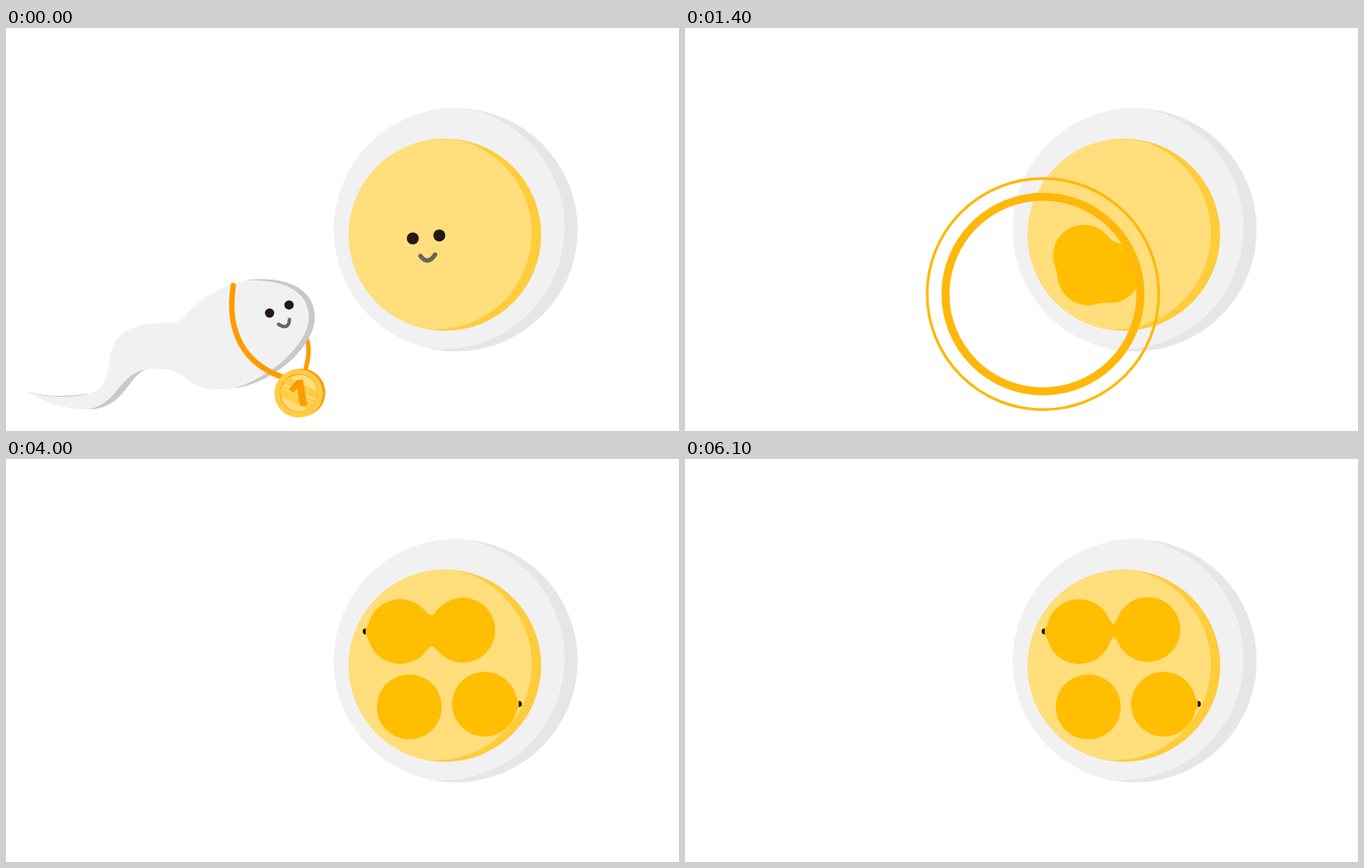
Write an HTML page that moves like this. It is 900 by 540 pixels and loops after 6600 ms.

```html
<!DOCTYPE html>
<html lang="en">
<head>
<meta charset="utf-8">
<title>Egg</title>
<style>
html, body { margin: 0; width: 100%; height: 100%; overflow: hidden; background: #fff; }
svg { display: block; width: 100vw; height: 100vh; }
</style>
</head>
<body>
<svg viewBox="0 0 900 540">
  <defs>
    <clipPath id="whiteClip"><circle cx="601.5" cy="270.3" r="163"/></clipPath>
    <clipPath id="yolkClip"><circle cx="587" cy="277" r="128.7"/></clipPath>
    <clipPath id="coinClip"><circle cx="391.5" cy="489" r="25"/></clipPath>
    <filter id="goo" filterUnits="userSpaceOnUse" x="440" y="140" width="300" height="290" color-interpolation-filters="sRGB">
      <feGaussianBlur stdDeviation="5.5"/>
      <feColorMatrix values="0 0 0 0 1  0 0 0 0 .745  0 0 0 0 0  0 0 0 18 -8.3"/>
    </filter>
    <linearGradient id="fade" gradientUnits="userSpaceOnUse" x1="0" x2="0">
      <stop offset="0" stop-color="#ffb80a" stop-opacity="0"/>
      <stop offset="1" stop-color="#ffb80a"/>
    </linearGradient>
  </defs>

  <g id="egg">
    <circle cx="601.5" cy="270.3" r="163" fill="#e6e6e6"/>
    <circle cx="584" cy="267.5" r="163" fill="#f1f1f1" clip-path="url(#whiteClip)"/>
    <path d="M570 110A163 163 0 0 0 560 428V110Z" fill="#f1f1f1" clip-path="url(#whiteClip)"/>
    <circle cx="587" cy="277" r="128.7" fill="#ffcc3b"/>
    <circle cx="574.5" cy="275" r="128.7" fill="#ffde7b" clip-path="url(#yolkClip)"/>
    <g id="face">
      <circle cx="544" cy="282" r="8" fill="#231815"/>
      <circle cx="579.5" cy="278" r="8" fill="#231815"/>
      <path d="M554.3 305.5Q564 318.5 573.8 303.6" fill="none" stroke="#6b665e" stroke-width="6" stroke-linecap="round"/>
    </g>
    <g id="cells" filter="url(#goo)"></g>
    <g id="nubs">
      <path d="M487 218Q483.5 226 480 227.5V235Q483.5 237 487 246Z" fill="#ffbe00"/>
      <path d="M481 227A4 4 0 0 0 481 235Z" fill="#111"/>
      <path d="M680 314Q683.5 323 686.5 324.5V332Q683.5 334 680 344Z" fill="#ffbe00"/>
      <path d="M685.8 324.2A4 4 0 0 1 685.8 332.2Z" fill="#111"/>
    </g>
  </g>

  <g id="swimmer">
    <path d="M402 416C408 432 403 450 396 474" fill="none" stroke="#ff9b00" stroke-width="6"/>
    <path fill="#f1f1f1" d="M28 487C60 497 95 492 110 490C155 480 120 425 165 404C195 390 225 400 237 389C265 355 300 340 330 337C380 333 413 352 413 388C413 425 355 482 290 484C262 485 248 477 238 467C225 457 212 456 190 457C165 460 160 511 110 511C75 511 50 500 28 487Z"/>
    <g fill="#c9c9c9">
      <path d="M320 338.2Q325 337.4 330 337C380 333 413 352 413 388C413 425 360 476 305 482.8C352 469 405 425 405 387C405 352 370 336 320 338.2Z"/>
      <path d="M190 457C165 460 160 511 110 511C152 503 150 462 190 457Z"/>
      <path d="M28 487C60 497 95 492 112 489.6C92 496 52 496 28 487Z"/>
    </g>
    <circle cx="352.5" cy="382" r="6.2" fill="#231815"/>
    <circle cx="378.5" cy="371.2" r="6.2" fill="#231815"/>
    <path d="M364.5 397C371 401.5 379 402 379 390.5" fill="none" stroke="#6b6766" stroke-width="4.6" stroke-linecap="round"/>
    <g id="medal">
      <path d="M304 345C297 390 305 445 370 468" fill="none" stroke="#ff9b00" stroke-width="7.2" stroke-linecap="round"/>
      <circle cx="394.8" cy="488.6" r="32.2" fill="#ff9b00"/>
      <circle cx="391.4" cy="489.6" r="32.4" fill="#ffcc45"/>
      <circle cx="391.5" cy="489" r="25.5" fill="#ff9b00"/>
      <g clip-path="url(#coinClip)">
        <circle cx="392.6" cy="489.6" r="25" fill="#ffde7b"/>
        <path d="M360 465L425 497M360 484L425 516" stroke="#ffcc45" stroke-width="10"/>
        <path d="M360 475L425 507" stroke="#ffcc45" stroke-width="3"/>
      </g>
      <text transform="translate(395 506.5) rotate(-10)" text-anchor="middle" font-family="'Open Sans', sans-serif" font-weight="800" font-size="49" fill="#ff9b00">1</text>
    </g>
  </g>

  <g id="rings" fill="none" stroke="#ffb80a"></g>
  <g id="rays" stroke="url(#fade)" stroke-width="5.2"></g>
</svg>
<script>
const LOOP = 6600, STEP = 100;
const $ = id => document.getElementById(id);
const clamp = x => Math.min(1, Math.max(0, x));
const mix = (a, b, k) => a + (b - a) * k;
const show = (el, on) => el.setAttribute('display', on ? 'inline' : 'none');

function add(parent, tag, attrs) {
  const el = document.createElementNS('http://www.w3.org/2000/svg', tag);
  set(el, attrs);
  return parent.appendChild(el);
}
function set(el, attrs) {
  for (const k in attrs) el.setAttribute(k, attrs[k]);
}
// keys: [[time, value, value...], ...], linear between neighbours
function track(keys, t) {
  let i = 0;
  while (i < keys.length - 2 && t >= keys[i + 1][0]) i++;
  const a = keys[i], b = keys[i + 1], k = clamp((t - a[0]) / (b[0] - a[0]));
  return a.slice(1).map((v, j) => mix(v, b[j + 1], k));
}

const paths = [
  [[800, 542, 330], [1100, 537, 321], [1800, 528.5, 283], [2650, 527, 231.3]],
  [[800, 542, 330], [1100, 539, 329], [1800, 539.3, 332.2]],
  [[800, 542, 330], [1100, 555, 328], [1800, 586, 327], [2650, 640, 328.5]],
  [[800, 542, 330], [1100, 538, 322], [1800, 528.5, 285], [2700, 529, 238.5], [4130, 619, 228.5]]
];
const size = [[800, 0], [1100, 41], [1800, 41.7], [2650, 43.6]];
const pose = [
  [700, 1, 0, 0, 1, 70, -25],
  [1100, .5, .11, 0, .99, 297, -53],
  [1350, 0, 0, 0, 0, 510, 360]
];
const ringSpec = [{ start: 731, width: 11.8 }, { start: 889, width: 23.7 }];
const bursts = [{ start: 600, x: 482.5, y: 360 }, { start: 4250, x: 586.5, y: 275 }];

const cells = paths.map(() => add($('cells'), 'circle', { fill: '#ffbe00' }));
const rings = ringSpec.map(() => add($('rings'), 'circle', { cx: 478.7, cy: 356.5 }));
// the tiny x offset keeps each line's box from being empty
const rays = Array.from({ length: 10 }, (_, i) =>
  add($('rays'), 'line', { x1: 0, x2: .01, transform: `rotate(${i * 36})` }));

function drawEgg(t) {
  const k = clamp((t - 4900) / 1200);
  const lift = -5.5 * (1 - Math.cos(2 * Math.PI * k)) / 2;
  $('egg').setAttribute('transform', `translate(0 ${lift})`);
  $('face').setAttribute('opacity', 1 - clamp((t - 900) / 400));
  show($('nubs'), t >= 2600);
  show($('cells'), t > 800);
  const [r] = track(size, t);
  cells.forEach((c, i) => {
    const [cx, cy] = track(paths[i], t);
    set(c, { cx, cy, r });
  });
}

function drawSwimmer(t) {
  const k = Math.pow(clamp(t / 700), 1.6);
  const m = t < 700 ? [1, 0, 0, 1, 70 * k, -25 * k] : track(pose, t);
  $('swimmer').setAttribute('transform', `matrix(${m})`);
  show($('swimmer'), t < 1350);
  show($('medal'), t < 1000);
}

function drawRings(t) {
  rings.forEach((ring, i) => {
    const { start, width } = ringSpec[i];
    const u = (t - start) / 1111;
    show(ring, u > 0 && u < .94);
    const left = 1 - clamp(u);
    set(ring, { r: 184 * (1 - left * left), 'stroke-width': width * Math.pow(left, 1.3) });
  });
}

function drawRays(t) {
  const b = bursts.find(b => t > b.start && t < b.start + 640);
  show($('rays'), b);
  if (!b) return;
  const p = t - b.start;
  const outer = mix(70, 189, 1 - (1 - clamp(p / 400)) ** 2);
  const inner = mix(70, 189, (p / 640) ** 2);
  $('rays').setAttribute('transform', `translate(${b.x} ${b.y})`);
  set($('fade'), { y1: -inner, y2: -inner - 8 });
  rays.forEach(l => set(l, { y1: -inner, y2: -outer }));
}

function draw(t) {
  drawEgg(t);
  drawSwimmer(t);
  drawRings(t);
  drawRays(t);
}

const begin = performance.now();
function tick(now) {
  const t = Math.max(0, now - begin) % LOOP;
  draw(Math.floor(t / STEP) * STEP);
  requestAnimationFrame(tick);
}
draw(0);
requestAnimationFrame(tick);
</script>
</body>
</html>
```
